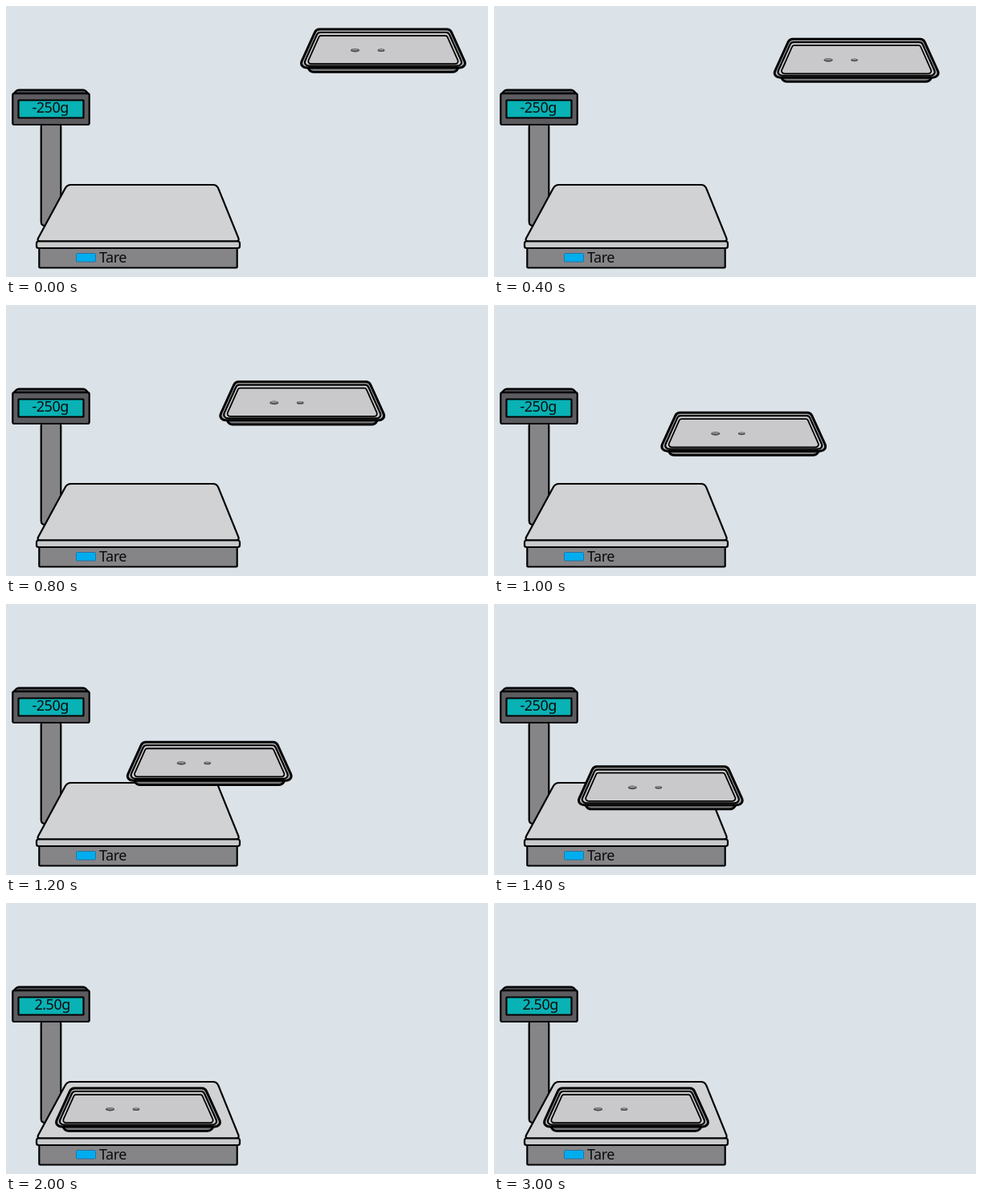
Write an HTML page that moves like this. It is 600x338 px and loops after 4000 ms.

```html
<!DOCTYPE html>
<html lang="en">
<head>
<meta charset="utf-8">
<title>Weighing a tray</title>
<style>
  html, body { margin: 0; width: 100%; height: 100%; overflow: hidden; background: #dbe2e8; }
  svg { display: block; width: 100%; height: 100%; }
  text { font: 18px "Noto Sans", "Open Sans", sans-serif; letter-spacing: -0.5px; fill: #0b0b0b; }
</style>
</head>
<body>
<svg viewBox="0 0 600 338">
  <rect width="600" height="338" fill="#dbe2e8"/>
  <g id="scale" stroke="#000" stroke-width="2.2" stroke-linejoin="round"></g>
  <rect x="87.5" y="308.5" width="24" height="10.5" rx="1" fill="#00aeef" stroke="#2c6f9b"/>
  <text x="116" y="320">Tare</text>
  <text id="reading" y="133"></text>
  <g id="tray" stroke="#000" stroke-linejoin="round"></g>
</svg>
<script>
const LOOP = 4000, STEP = 100;
const START = 102, TRAVEL = 1753, RAMP = 0.4;
const SHIFT = { x: -305, y: 202 };
const $ = id => document.getElementById(id);

function add(parent, tag, attrs) {
  const el = document.createElementNS("http://www.w3.org/2000/svg", tag);
  for (const key in attrs) el.setAttribute(key, attrs[key]);
  parent.appendChild(el);
}

// Closed polygon with softened corners
function rounded(pts, r) {
  const n = pts.length;
  const toward = (a, b) => {
    const k = Math.min(0.5, r / Math.hypot(b[0] - a[0], b[1] - a[1]));
    return [a[0] + (b[0] - a[0]) * k, a[1] + (b[1] - a[1]) * k];
  };
  return pts.map((p, i) => {
    const from = toward(p, pts[(i + n - 1) % n]);
    const to = toward(p, pts[(i + 1) % n]);
    return `${i ? "L" : "M"}${from}Q${p} ${to}`;
  }).join("") + "Z";
}

// Right-hand profile of [half width, y] points, reflected about cx
const mirror = (cx, side) => [
  ...side.map(([w, y]) => [cx + w, y]),
  ...side.map(([w, y]) => [cx - w, y]).reverse()
];

const slab = (cx, half, top, bottom) => mirror(cx, [[half, top], [half, bottom]]);

function shape(parent, fill, r, pts, width = 2.2) {
  add(parent, "path", { d: rounded(pts, r), fill, "stroke-width": width });
}

function buildScale(g) {
  const head = 56, base = 164.5;
  shape(g, "#858588", 5, slab(head, 12.3, 146, 274));
  shape(g, "#434449", 2, mirror(head, [[42, 104.7], [47.7, 110.5]]));
  shape(g, "#5c5c60", 2, slab(head, 47.7, 109.2, 148));
  shape(g, "#08b2b5", 0.5, slab(head, 40.5, 117.5, 139.5));
  shape(g, "#858588", 1, slab(base, 123.2, 299, 326.5));
  shape(g, "#d1d2d4", 5, [[76, 223], [262.5, 223], [291, 293.5], [38, 293.5]]);
  shape(g, "#c9cacc", 2.5, slab(base, 126.5, 293.5, 302));
}

function buildTray(g) {
  const cx = 469.5;
  shape(g, "#77787a", 5, mirror(cx, [[96, 72], [91, 82.3]]), 2.8);
  ["#b4b5b7", "#cdcdcf", "#c9c9cb"].forEach((fill, i) => {
    const top = 29 + 4 * i, bottom = 77 - 2.4 * i;
    const half = 102.8 - 4.6 * i;
    const side = [[83.3 - 2 * i, top], [half, bottom - 5 + i], [half - 4 + i, bottom]];
    shape(g, fill, 4 - i, mirror(cx, side), 3 / (1 + i * 0.35));
  });
  for (const [x, size] of [[434.5, 1], [467, 0.8]]) {
    const spot = (fill, cy, rx, ry) =>
      add(g, "ellipse", { cx: x, cy, rx: rx * size, ry: ry * size, fill, stroke: "none" });
    spot("#4f4f52", 55.2, 5.5, 2.3);
    spot("#929295", 54.5, 4, 1.1);
  }
}

// Constant acceleration, steady run, constant braking
function glide(u) {
  u = Math.max(0, Math.min(1, u));
  if (u > 0.5) return 1 - glide(1 - u);
  const top = 1 / (1 - RAMP);
  return u < RAMP ? top * u * u / (2 * RAMP) : top * (u - RAMP / 2);
}

function draw(ms) {
  const t = Math.floor((ms % LOOP) / STEP) * STEP;
  const p = glide((t - START) / TRAVEL);
  $("tray").setAttribute("transform", `translate(${SHIFT.x * p} ${SHIFT.y * p})`);
  const weighed = t >= 2000;
  $("reading").textContent = weighed ? "2.50g" : "-250g";
  $("reading").setAttribute("x", weighed ? 35.5 : 32.5);
}

buildScale($("scale"));
buildTray($("tray"));
draw(0);
const begin = performance.now();
requestAnimationFrame(function tick() {
  draw(performance.now() - begin);
  requestAnimationFrame(tick);
});
</script>
</body>
</html>
```
